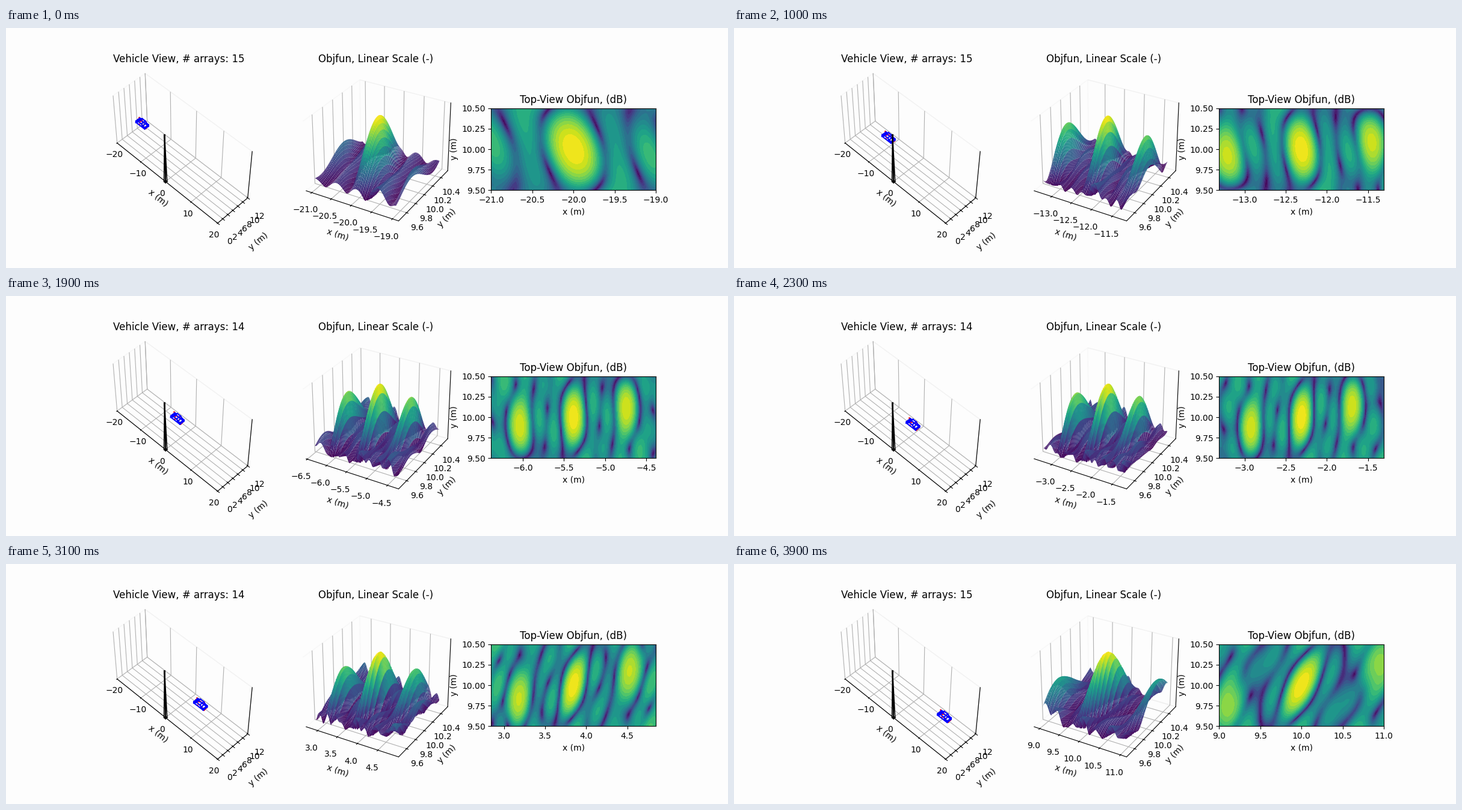
These frames come from a looping animation (1200x400 px, 4000 ms). A matplotlib script:

```python
import numpy as np
import matplotlib.pyplot as plt
from matplotlib.animation import FuncAnimation

FRAMES = 40
START, END, LANE = -20.0, 10.0, 10.0
TOWER_HEIGHT = 20.0
WAVELENGTH = 0.036
FLOOR = 0.04          # keeps the nulls from going to minus infinity in dB
PAPER = '#fdfdfd'
GAP = np.full((1, 3), np.nan)


def vehicle():
    """Side profile drawn twice and joined by crossbars."""
    x = np.array([-1.85, -1.85, -1.2, -0.8, 0.5, 1.0, 1.85, 1.85, -1.85])
    z = np.array([0.2, 0.8, 0.9, 1.4, 1.4, 0.9, 0.8, 0.2, 0.2])
    left, right = (np.column_stack([x, np.full(9, y), z]) for y in (0.8, -0.8))
    parts = [left, GAP, right, GAP]
    for p, q in zip(left[:-1], right[:-1]):
        parts += [[p, q], GAP]
    return np.vstack(parts)


def tower():
    r = 0.3
    base = np.array([[r, -r, 0], [r, r, 0], [-r, r, 0], [-r, -r, 0], [r, -r, 0]])
    legs = [np.vstack([[c, [0, 0, TOWER_HEIGHT]], GAP]) for c in base[:-1]]
    return np.vstack([base, GAP] + legs)


def antennas():
    """Four loose groups along the vehicle, spread over its width."""
    rng = np.random.default_rng(4)
    group = np.repeat([-1.88, -0.63, 0.63, 1.88], 4)[:15]
    side = np.tile([-0.85, -0.3, 0.3, 0.85], 4)[:15]
    x = group - 0.2 * side + rng.uniform(-0.25, 0.25, 15)
    y = side + rng.uniform(-0.2, 0.2, 15)
    z = rng.uniform(0.3, 1.4, 15)
    return np.column_stack([x, y, z])


def objective(X, Y, arrays):
    """Magnitude of the coherent sum over all arrays."""
    d = np.sqrt((X[..., None] + arrays[:, 0]) ** 2
                + (Y[..., None] + arrays[:, 1]) ** 2
                + (arrays[:, 2] - TOWER_HEIGHT) ** 2)
    ref = np.sqrt((X.mean() + arrays[:, 0]) ** 2
                  + (LANE + arrays[:, 1]) ** 2
                  + (arrays[:, 2] - TOWER_HEIGHT) ** 2)
    total = np.exp(2j * np.pi * (d - ref) / WAVELENGTH).mean(axis=-1)
    return np.hypot(np.abs(total), FLOOR) / np.hypot(1, FLOOR)


def padded(low, high):
    """Limits with the data margin and the 3D view margin."""
    half = (high - low) / 2 * 1.1 * 25 / 24
    mid = (low + high) / 2
    return mid - half, mid + half


def style_3d(ax):
    ax.set_facecolor(PAPER)
    ax.set_xlabel('x (m)')
    ax.set_ylabel('y (m)')
    ax.set_zticks([])
    for axis in (ax.xaxis, ax.yaxis, ax.zaxis):
        axis.pane.set_fill(False)


fig = plt.figure(figsize=(12, 4), dpi=100, facecolor=PAPER)
view = fig.add_subplot(1, 3, 1, projection='3d')
hill = fig.add_subplot(1, 3, 2, projection='3d')
top = fig.add_subplot(1, 3, 3)

CAR = vehicle()
ARRAYS = antennas()
dots, = view.plot([], [], [], 'r.', ms=2)
car, = view.plot([], [], [], color='b', lw=1.5)
view.plot(*tower().T, color='k', lw=1.2)
view.set(xlim=(-20, 20), ylim=(0, 12), zlim=(0, 20))
view.set_box_aspect((40, 12, 20))
view.view_init(elev=50, azim=-45)
style_3d(view)

hill.set_title('Objfun, Linear Scale (-)')
style_3d(hill)

top.set_title('Top-View Objfun, (dB)')
top.set_xlabel('x (m)')
top.set_ylabel('y (m)')
top.set_aspect('equal')

plots = []


def draw(i):
    x0 = START + (END - START) * i / (FRAMES - 1)
    arrays = np.delete(ARRAYS, 7, axis=0) if abs(x0) < 6 else ARRAYS
    offset = np.array([x0, LANE, 0])
    car.set_data_3d(*(CAR + offset).T)
    dots.set_data_3d(*(arrays + offset).T)
    view.set_title(f'Vehicle View, # arrays: {len(arrays)}')

    X, Y = np.meshgrid(np.linspace(x0 - 1, x0 + 1, 100),
                       np.linspace(LANE - 0.5, LANE + 0.5, 100))
    Z = objective(X, Y, arrays)
    dB = 20 * np.log10(Z)
    while plots:
        plots.pop().remove()
    plots.append(hill.plot_surface(X, Y, Z, cmap='viridis'))
    plots.append(top.contourf(X, Y, dB, np.linspace(dB.min(), dB.max(), 21),
                              cmap='viridis'))
    hill.set_xlim(*padded(x0 - 1, x0 + 1))
    hill.set_ylim(*padded(LANE - 0.5, LANE + 0.5))
    hill.set_zlim(*padded(Z.min(), Z.max()))
    top.set_xlim(x0 - 1, x0 + 1)
    top.set_ylim(LANE - 0.5, LANE + 0.5)
    return []


anim = FuncAnimation(fig, draw, frames=FRAMES, interval=100, repeat=True,
                     repeat_delay=0, blit=False)
plt.show()
```
